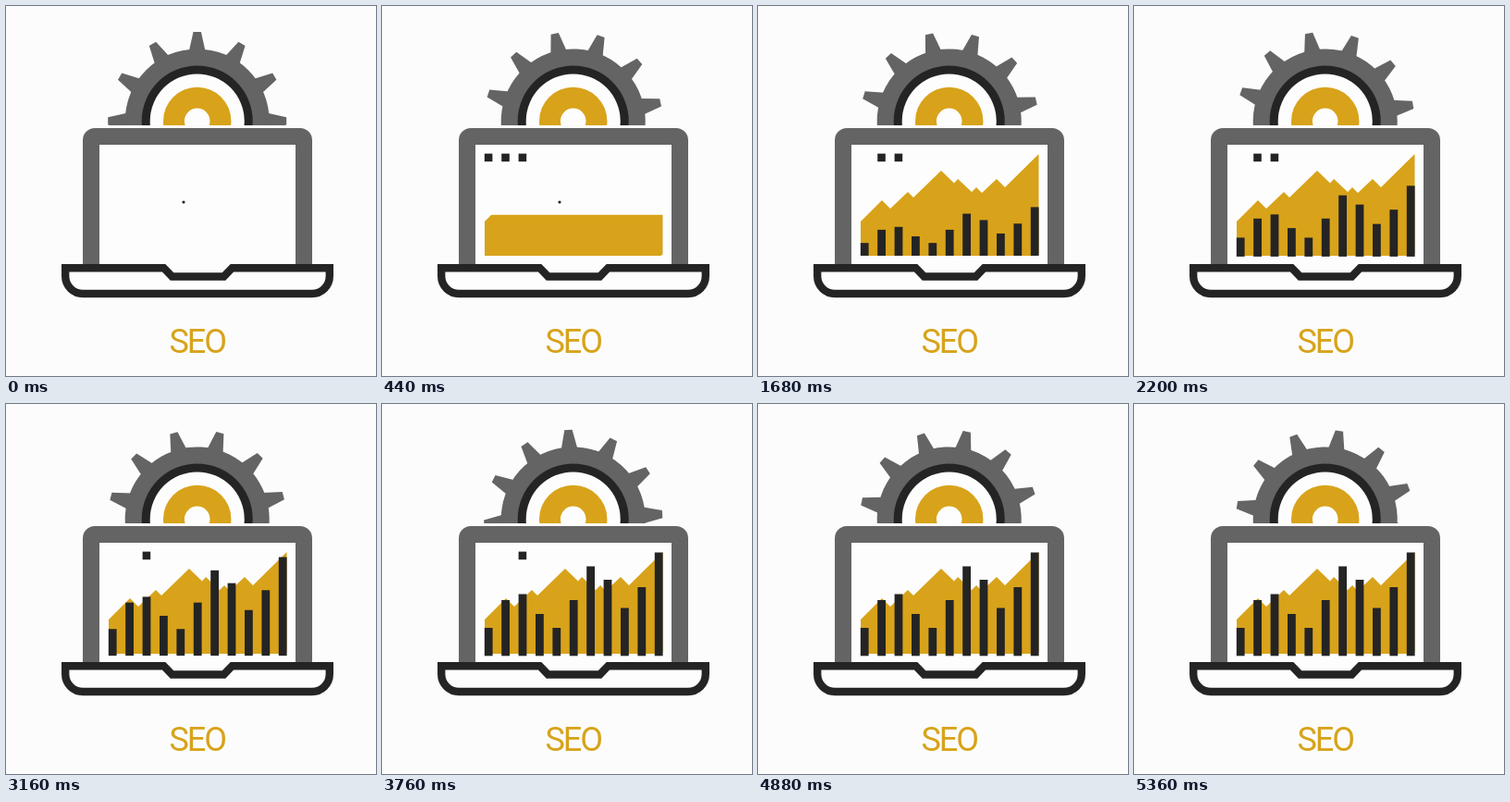
An HTML page that plays this animation: 400 px wide and 400 px high, repeating every 5400 ms.

```html
<!DOCTYPE html>
<html lang="en">
<head>
<meta charset="utf-8">
<title>SEO</title>
<style>
  html, body { margin: 0; width: 100%; height: 100%; overflow: hidden; background: #fcfcfc; }
  svg { display: block; width: 100%; height: 100%; }
  .grey { fill: #646464; }
  .dark { fill: #242424; }
  .gold { fill: #d8a31a; }
  .paper { fill: #fdfdfd; }
  text { font: 400 36px Roboto, "Liberation Sans", sans-serif; letter-spacing: -2px; }
</style>
</head>
<body>
<svg viewBox="0 0 400 400">
  <defs>
    <clipPath id="above"><rect x="90" y="0" width="230" height="129"/></clipPath>
    <clipPath id="wipe"><rect id="wipeBox" x="105" width="205" y="270" height="0"/></clipPath>
  </defs>

  <g clip-path="url(#above)">
    <g transform="translate(206.7 124.4)">
      <g id="gear" class="grey"><circle r="78"/></g>
      <circle class="dark" r="60"/>
      <circle class="paper" r="51"/>
      <circle class="gold" r="36.7"/>
      <circle class="paper" r="13.8"/>
    </g>
  </g>

  <path class="grey" d="M83 281V145a13 13 0 0 1 13-13H318a13 13 0 0 1 13 13V281Z"/>
  <rect class="paper" x="101" y="150" width="212" height="134"/>
  <circle class="dark" cx="192" cy="212" r="1.6"/>
  <g id="squares" class="dark"></g>
  <path class="gold" clip-path="url(#wipe)" d="M111 233L134 210L143 219L162 201L168 207L198 178L212 191.5L216 187L231 201L236 196L242 202L258 187L267 196L303.5 160V267a3 3 0 0 1-3 3H111Z"/>
  <g id="bars" class="dark"></g>

  <path class="paper" stroke="#242424" stroke-width="8.4" d="M64.2 283.2H170.5L179.5 292.5H235.5L244.5 283.2H349.8V292a19 19 0 0 1-19 19H83.2a19 19 0 0 1-19-19Z"/>
  <text class="gold" x="176.4" y="375">SEO</text>
</svg>
<script>
const LOOP = 5400, STEP = 40, SPIN = 4.805;
const BASE = 269, PITCH = 18.4, LEFT = 110.8;
const tops = [242, 212, 205.5, 227, 242, 212, 175.5, 190, 220.5, 198, 160.5];
const lateBars = [5, 10];
const squareTimes = [[120, 800], [200, 2670], [280, 4540]];

const $ = id => document.getElementById(id);

function add(parent, tag, attrs) {
  const el = document.createElementNS("http://www.w3.org/2000/svg", tag);
  for (const key in attrs) el.setAttribute(key, attrs[key]);
  return parent.appendChild(el);
}

const clamp = v => Math.min(1, Math.max(0, v));

// Easing with flat ends; x1 and x2 are the horizontal handles.
function ease(u, x1, x2) {
  u = clamp(u);
  let lo = 0, hi = 1;
  for (let i = 0; i < 24; i++) {
    const s = (lo + hi) / 2, r = 1 - s;
    const x = 3 * s * r * r * x1 + 3 * s * s * r * x2 + s * s * s;
    if (x < u) lo = s; else hi = s;
  }
  return lo * lo * (3 - 2 * lo);
}

const gear = $("gear");
for (let a = 0; a < 360; a += 30)
  add(gear, "path", { d: "M-9-75L-4.2-96.5H4.2L9-75Z", transform: `rotate(${a})` });

const squares = squareTimes.map((_, i) =>
  add($("squares"), "rect", { x: LEFT + i * PITCH, y: 159.6, width: 8.6, height: 8.6 }));

const bars = tops.map((_, i) =>
  add($("bars"), "rect", { x: LEFT + i * PITCH, width: 8.8 }));

function draw(time) {
  const t = Math.max(0, Math.floor(time / STEP) * STEP - STEP);

  gear.setAttribute("transform", `rotate(${SPIN * t / STEP})`);

  const reveal = 110 * ease(t / 920, 0.333, 0.667);
  $("wipeBox").setAttribute("y", 270 - reveal);
  $("wipeBox").setAttribute("height", reveal);

  squareTimes.forEach(([on, off], i) => {
    squares[i].setAttribute("opacity", clamp((t - on) / 80) * clamp((off + 80 - t) / 160));
  });

  const grow = ease(t / 3700, 0.31, 0.58);
  const bottom = 267.8 + 4.5 * grow;
  bars.forEach((bar, i) => {
    const y = BASE + (tops[i] - BASE) * grow;
    const start = lateBars.includes(i) ? 1240 : 600;
    bar.setAttribute("y", y);
    bar.setAttribute("height", t < start ? 0 : Math.max(0, bottom - y));
  });
}

const origin = performance.now();
function frame() {
  draw((performance.now() - origin) % LOOP);
  requestAnimationFrame(frame);
}
draw(0);
requestAnimationFrame(frame);
</script>
</body>
</html>
```
